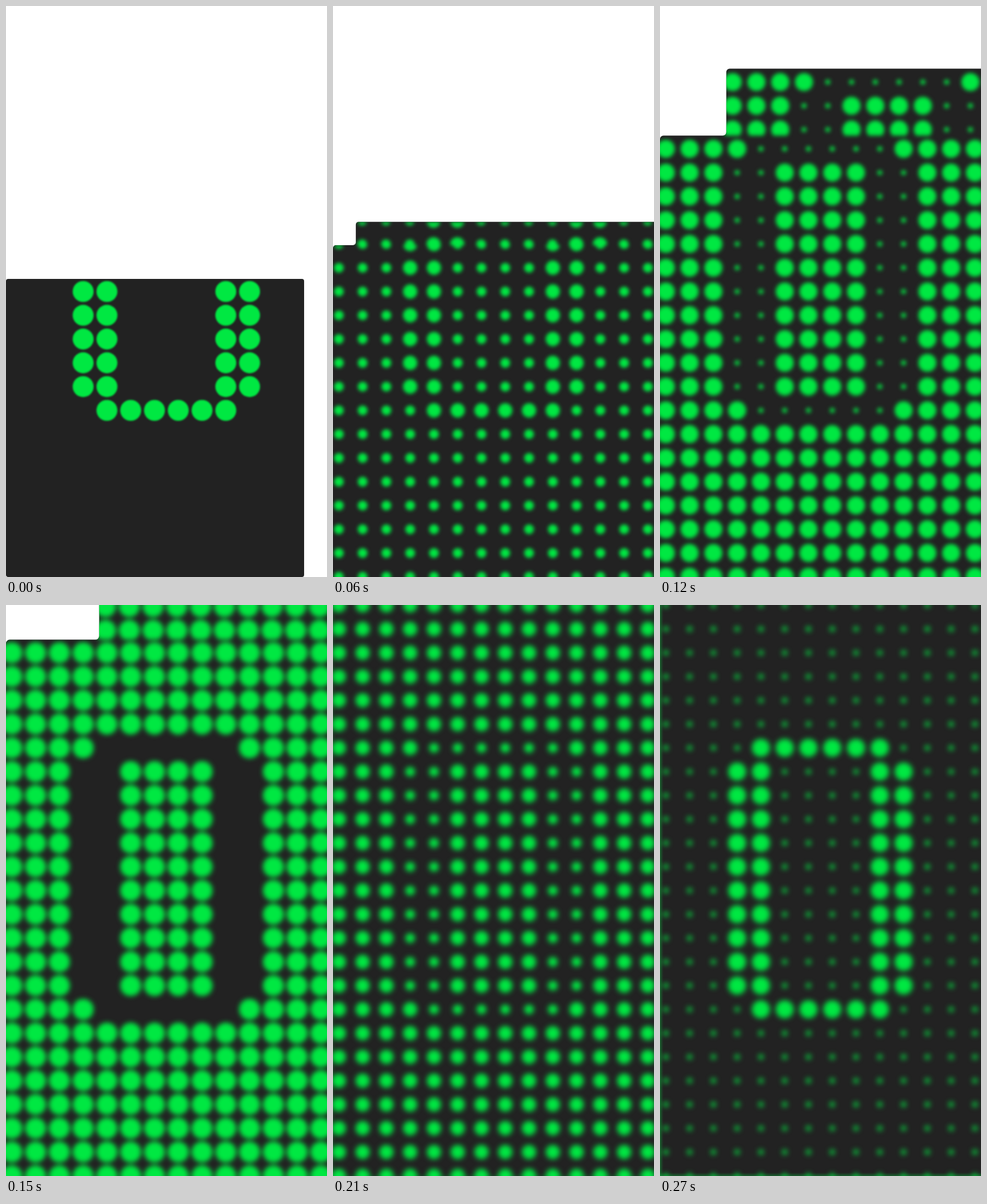
Write an HTML page with a canvas that moves like this. It is 561 px wide and 998 px high and loops after 0.3 s.

```html
<!DOCTYPE html>
<html lang="en">
<head>
<meta charset="utf-8">
<title>Dot matrix zero</title>
<style>
  html, body { margin: 0; width: 100%; height: 100%; overflow: hidden; background: #fff; }
  canvas { display: block; width: 561px; height: 998px; }
</style>
</head>
<body>
<canvas id="stage" width="561" height="998"></canvas>
<script>
const W = 561, H = 998, PAD = 40;
const STEP = 30, COUNT = 10, TURN = COUNT / 2;
const DARK = '#222222', GREEN = '#00e842';
const PITCH = 41.55, X0 = 10.2, Y0 = 0.4, DOT = 18.3;

function makeCanvas(w, h) {
  const c = document.createElement('canvas');
  c.width = w;
  c.height = h;
  return c;
}

const ease = u => 1.2 * u - 0.2 * u ** 3;

// Everything that moves, as a function of the step number
function pose(k) {
  const u = Math.abs(k - TURN) / TURN;
  const rise = 14.62 * k ** 2 + 0.0163 * k ** 5;
  return {
    rise,
    top: 477 - rise,
    shift: 14.3 * k ** 1.515,
    round: 4 + k / 2,
    lit: DOT * ease(u),
    unlit: DOT * ease(1 - u),
    blur: 1.4 + 1.2 * Math.sqrt(k),
    edge: Math.max(0, (k - 6) / 10)
  };
}

// The digit: an outline with two-wide sides and one-wide caps
function isLit(col, row) {
  if (row === 6 || row === 17) return col >= 4 && col <= 9;
  return row > 6 && row < 17 && [3, 4, 9, 10].includes(col);
}

// Dots moved by (dx, -dx), kept between two heights
function drawDots(g, { lit, unlit }, dx, from, to) {
  g.save();
  g.beginPath();
  g.rect(-PAD, from, W + 2 * PAD, to - from);
  g.clip();
  g.translate(dx, -dx);
  g.beginPath();
  for (let row = 0; row <= 24; row++) {
    for (let col = 0; col <= 13; col++) {
      const x = X0 + col * PITCH, y = Y0 + row * PITCH;
      const r = isLit(col, row) ? lit : unlit;
      g.moveTo(x + r, y);
      g.arc(x, y, r, 0, 2 * Math.PI);
    }
  }
  g.fillStyle = GREEN;
  g.fill();
  g.restore();
}

function glow(g, x, y, toX, toY, strength) {
  const fade = g.createLinearGradient(x, y, toX, toY);
  fade.addColorStop(0, `rgba(0, 232, 66, ${strength})`);
  fade.addColorStop(1, 'rgba(0, 232, 66, 0)');
  g.fillStyle = fade;
  g.fillRect(0, 0, W, H);
}

function panels({ rise, top, shift, round }) {
  const size = H - top, path = new Path2D();
  path.roundRect(0, top, size, size + rise, round);
  if (shift) path.roundRect(shift - 1, top - shift, size, size, round);
  // Rounded inner corner where the two panels meet
  if (shift > 2 * round) {
    const x = shift - 1, r = round;
    path.moveTo(x, top);
    path.lineTo(x - r, top);
    path.arc(x - r, top - r, r, Math.PI / 2, 0, true);
    path.closePath();
  }
  return path;
}

function render(k) {
  const c = makeCanvas(W, H), g = c.getContext('2d');
  const p = pose(k);

  const layer = makeCanvas(W + 2 * PAD, H + 2 * PAD);
  const d = layer.getContext('2d');
  d.translate(PAD, PAD);
  drawDots(d, p, p.shift, p.top - p.shift, p.top);
  drawDots(d, p, 0, p.top, H + PAD);

  g.fillStyle = '#fff';
  g.fillRect(0, 0, W, H);
  const area = panels(p);
  g.fillStyle = DARK;
  g.fill(area);

  g.clip(area);
  g.filter = `blur(${p.blur}px)`;
  g.drawImage(layer, -PAD, -PAD);
  g.filter = 'none';
  glow(g, 0, 0, 6, 0, p.edge);
  glow(g, 0, H, 0, H - 6, p.edge);
  return c;
}

const pictures = Array.from({ length: COUNT }, (_, k) => render(k));
const stage = document.getElementById('stage').getContext('2d');
const start = performance.now();

function tick() {
  const time = performance.now() - start;
  stage.drawImage(pictures[Math.floor(time / STEP) % COUNT], 0, 0);
  requestAnimationFrame(tick);
}
tick();
</script>
</body>
</html>
```
